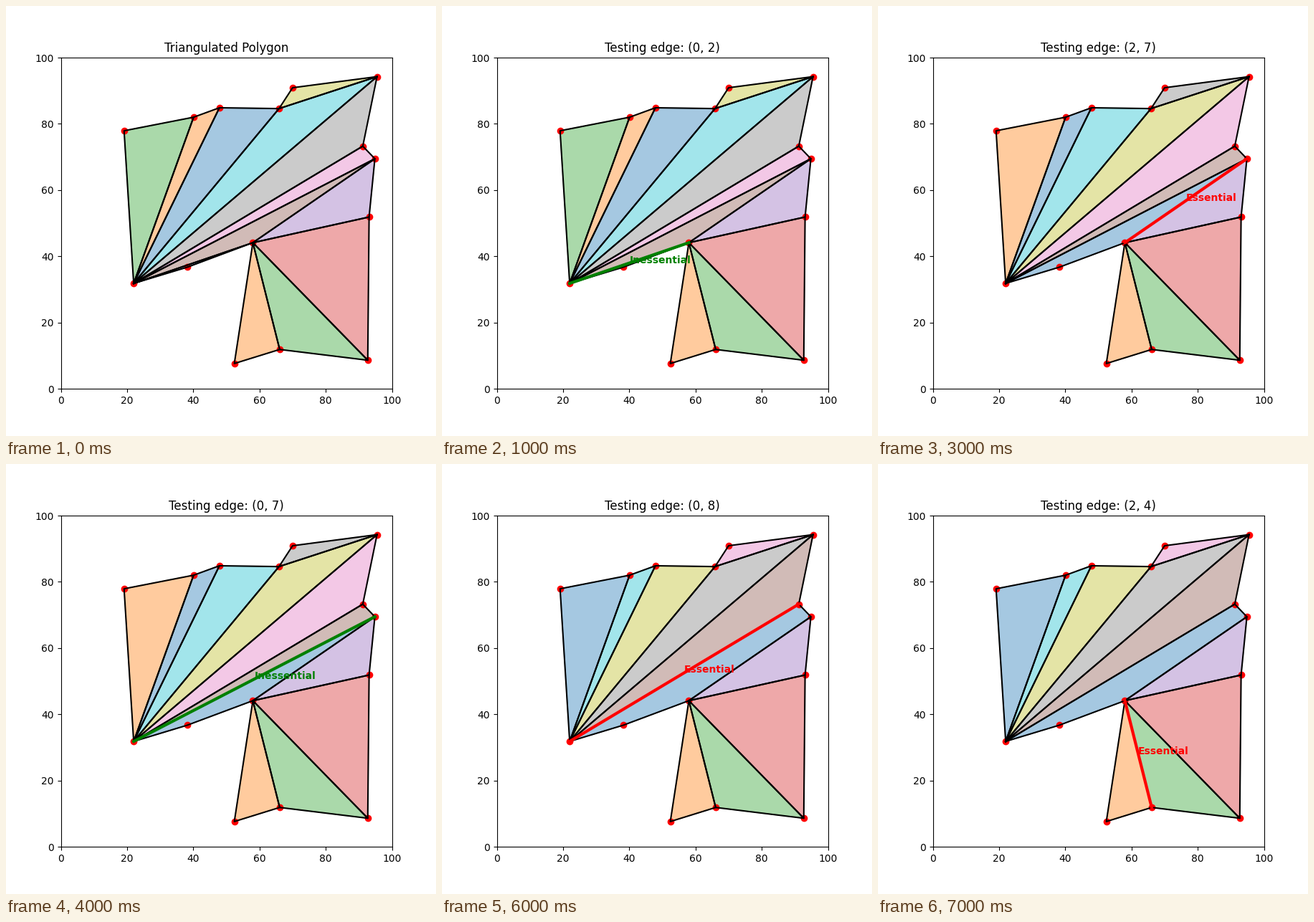
Write a matplotlib script that moves like this. It is 600 px wide and 600 px high and loops after 8 s.

```python
from itertools import islice

import matplotlib.pyplot as plt
from matplotlib.animation import FuncAnimation
import numpy as np

# Polygon corners, counter-clockwise
POINTS = np.array([
    (22, 31.8), (38.2, 36.7), (58, 44.1), (52.4, 7.6), (66.1, 11.85),
    (92.7, 8.6), (93.1, 51.85), (94.85, 69.45), (91.2, 73.25), (95.5, 94.25),
    (70, 90.9), (65.9, 84.6), (47.9, 84.85), (40.1, 82), (19.1, 77.9),
])
SCENE_COUNT = 8


def turn(a, b, c):
    """Positive when the path a-b-c turns left."""
    (ux, uy), (vx, vy) = POINTS[b] - POINTS[a], POINTS[c] - POINTS[b]
    return ux * vy - uy * vx


def sides(piece):
    return list(zip(piece, piece[1:] + piece[:1]))


def is_convex(piece):
    n = len(piece)
    return all(turn(piece[i - 2], piece[i - 1], piece[i]) > 0 for i in range(n))


def is_ear(tri, corners):
    def inside(p):
        return all(turn(a, b, p) > 0 for a, b in sides(tri))

    return is_convex(tri) and not any(inside(p) for p in corners if p not in tri)


def triangulate():
    """Clip the first ear again and again."""
    corners = list(range(len(POINTS)))
    triangles = []
    while len(corners) > 2:
        for i in range(1, len(corners) - 1):
            tri = corners[i - 1:i + 2]
            if is_ear(tri, corners):
                triangles.append(tri)
                del corners[i]
                break
    return triangles


def next_edge(pieces, tested):
    """Find the first untested edge that two pieces share."""
    for piece in pieces:
        for side in sides(piece):
            edge = tuple(sorted(side))
            owners = [p for p in pieces if set(edge) <= set(p)]
            if len(owners) == 2 and edge not in tested:
                return edge, owners
    return None


def scenes():
    """Yield (title, pieces, edge, essential) while merging convex pieces."""
    pieces, tested, step = triangulate(), set(), 0
    yield "Triangulated Polygon", pieces, None, False
    while found := next_edge(pieces, tested):
        edge, (first, second) = found
        tested.add(edge)
        joined = sorted(set(first + second))
        essential = not is_convex(joined)
        yield f"Testing edge: {edge}", pieces, edge, essential
        if not essential:
            step += 1
            pieces = [joined if p == first else p for p in pieces if p != second]
            yield f"Step {step}: merged (Inessential edge)", pieces, edge, False


SCENES = list(islice(scenes(), SCENE_COUNT))
fig, ax = plt.subplots(figsize=(6, 6), dpi=100)


def draw_piece(piece, color):
    x, y = POINTS[piece + piece[:1]].T
    ax.fill(x, y, color=color, alpha=0.4)
    ax.plot(x, y, color="black", lw=1.5)


def draw_edge(edge, essential):
    ends = POINTS[list(edge)]
    color = "red" if essential else "green"
    label = "Essential" if essential else "Inessential"
    ax.plot(*ends.T, color=color, lw=3)
    ax.text(*ends.mean(axis=0), label, color=color, fontsize=10, weight="bold")


def draw(i):
    title, pieces, edge, essential = SCENES[i]
    ax.clear()
    ax.set(xlim=(0, 100), ylim=(0, 100), aspect="equal")
    ax.set_title(title)
    for k, piece in enumerate(pieces):
        draw_piece(piece, f"C{k % 10}")
    ax.scatter(*POINTS.T, color="red")
    if edge:
        draw_edge(edge, essential)
    return []


anim = FuncAnimation(fig, draw, frames=len(SCENES), interval=1000, repeat=True)
plt.show()
```
